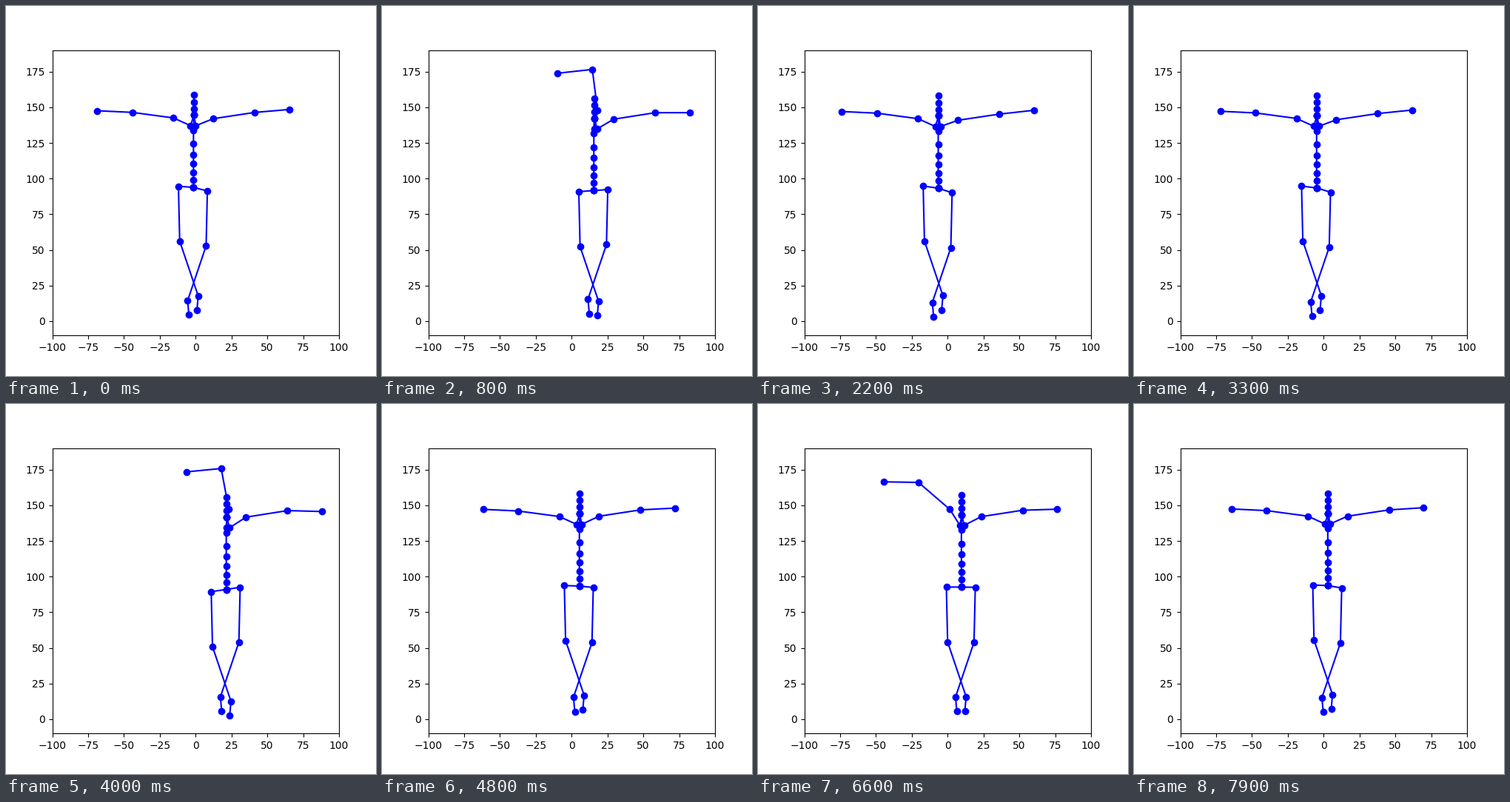
Animation of 500x500 px, one loop 8000 ms. Source, as a matplotlib script:

```python
import numpy as np
import matplotlib.pyplot as plt
from matplotlib.animation import FuncAnimation

FRAMES, STEP = 80, 100

# sideways turning points of the hips: (time in 100 ms, x)
SWAY = [(0, -1.5), (5, 3.5), (8, 15.5), (11, 29), (16.5, -6.8), (18.5, -5.5),
        (27, -8.4), (33, -4.9), (36, 8), (41, 22.3), (48, 5.4), (56, -1),
        (66, 9.6), (72, 30.5), (79, 2.9)]
# each raise of the arm: start, top, end
RAISES = [(0, 8, 17), (33, 41, 48), (63, 69.5, 76)]

SPINE = [0, 5.2, 10.4, 16.5, 23, 30.5, 40, 50.8, 55.3, 60, 64.8]
NECK = 7
LEG = np.array([(0, 0), (.9, -38.6), (13.8, -77), (12.9, -87)])


def smooth(keys, t):
    """Monotone cubic through the keys."""
    k, v = np.array(keys, float).T
    h = np.diff(k)
    d = np.diff(v) / h
    m = np.zeros(len(k))
    a, b = d[:-1], d[1:]
    same = a * b > 0
    m[1:-1][same] = 2 * a[same] * b[same] / (a + b)[same]
    i = np.clip(np.searchsorted(k, t, side="right") - 1, 0, len(h) - 1)
    s = (t - k[i]) / h[i]
    return (v[i] + (v[i + 1] - v[i]) * s * s * (3 - 2 * s)
            + h[i] * s * (1 - s) * (m[i] * (1 - s) - m[i + 1] * s))


def ease(a, b, t):
    s = np.clip((t - a) / (b - a), 0, 1)
    return s * s * (3 - 2 * s)


times = np.arange(FRAMES)
sway = smooth(SWAY, times)
lift = sum(ease(a, top, times) - ease(top, b, times) for a, top, b in RAISES)


def raised_arm(p):
    angles = np.radians([155.5 - 76 * p, 172.3 - 75 * p, 177.3 + 9 * p * p])
    bones = np.array([13.2, 29, 24.4])[:, None] * np.column_stack(
        [np.cos(angles), np.sin(angles)])
    base = np.array([-2 + 2.2 * p, 43.3])
    return np.vstack([base, base + np.cumsum(bones, axis=0)])


def level_arm(x, p):
    return np.array([(1.6 + .7 * p, 43.3), (13.8, 48.4 + .11 * x),
                     (42.7, 52.8 + .12 * x), (66.9, 54.7)])


def pose(i):
    x, p = sway[i], lift[i]
    root = np.array([x, 94 - .11 * abs(x) - .7 * p])
    spine = np.array([(.3 if j >= NECK else 0, y) for j, y in enumerate(SPINE)])
    chains = [spine] + [np.vstack([spine[NECK], arm])
                        for arm in (raised_arm(p), level_arm(x, p))]
    drop = -.85 + .085 * np.clip(x, 0, 10)
    tilt = 1.45 - .14 * x
    for side in (-1, 1):
        hip = np.array([10.1 * side - .4, drop - tilt * side])
        chains.append(np.vstack([(0, 0), hip + LEG * (-side, 1)]))
    return [c + root for c in chains]


fig, ax = plt.subplots(figsize=(5, 5), dpi=100)
ax.set_xlim(-100, 100)
ax.set_ylim(-10, 190)
lines = [ax.plot([], [], "bo-")[0] for _ in range(5)]


def update(i):
    for line, chain in zip(lines, pose(i)):
        line.set_data(chain[:, 0], chain[:, 1])
    return lines


anim = FuncAnimation(fig, update, frames=FRAMES, interval=STEP,
                     repeat=True, repeat_delay=0)
plt.show()
```
